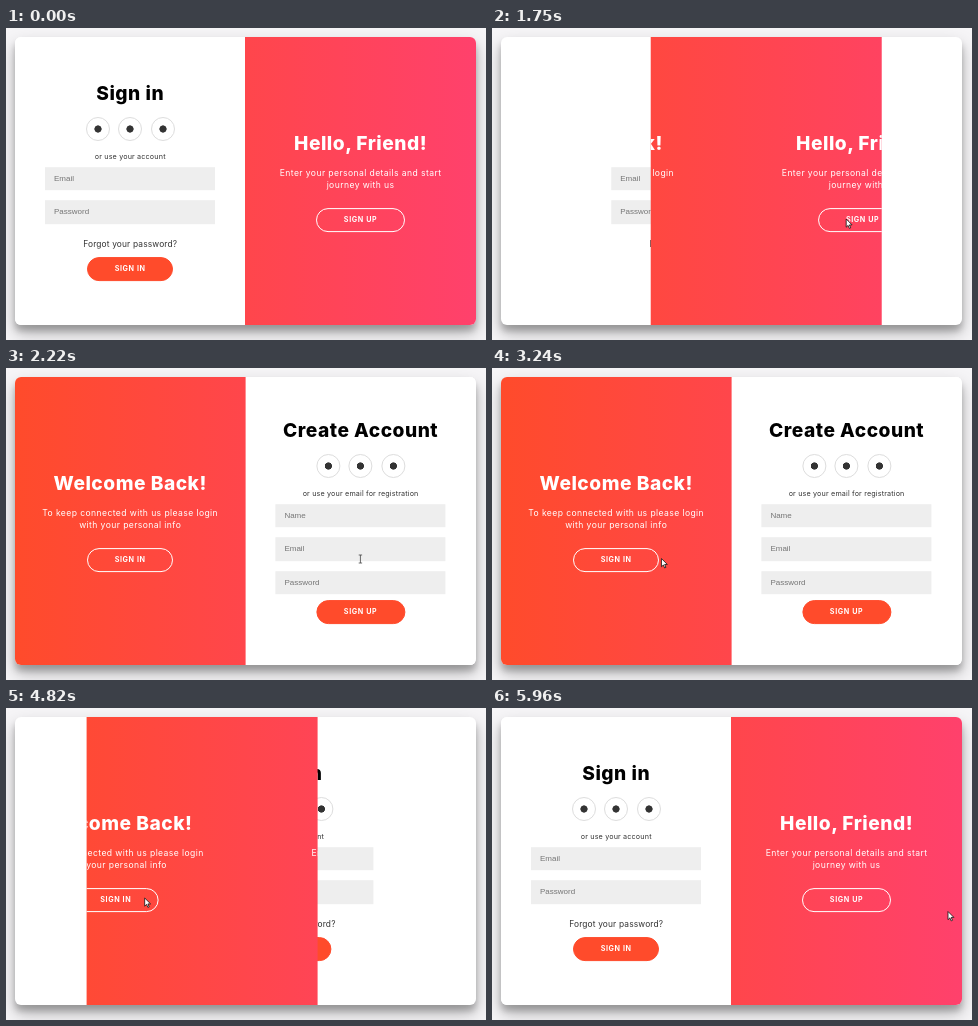
Recreate the animation shown at these times as an HTML page. Size 480x312 px, loop 6.03 s.

```html
<!DOCTYPE html>
<html lang="en">
<head>
<meta charset="utf-8">
<title>Sliding sign-in panel</title>
<style>
  html, body { margin: 0; width: 100%; height: 100%; overflow: hidden; background: #f6f5f7; }
  body { font: 8.6px/12px Inter, sans-serif; color: #333; }
  #stage { --p: 0; position: relative; width: 480px; height: 312px; overflow: hidden; }

  .card, .half, .slider, .overlay, .row, .ghost, #pointer { position: absolute; }
  .card {
    left: 9px; top: 9px; width: 460.8px; height: 288px; overflow: hidden;
    border-radius: 6px; background: #fff;
  }
  .shadow { box-shadow: 0 8.4px 16.8px rgba(0,0,0,.25), 0 6px 6px rgba(0,0,0,.22); }
  .half { top: 0; left: 0; width: 50%; height: 100%; }
  .form { background: #fff; transform: translateX(calc(var(--p) * 100%)); }

  .slider {
    top: 0; left: 50%; width: 50%; height: 100%; overflow: hidden;
    transform: translateX(calc(var(--p) * -100%));
  }
  .overlay {
    top: 0; left: -100%; width: 200%; height: 100%; color: #fff;
    background: linear-gradient(to right, #ff4b2b, #ff416c);
    transform: translateX(calc(var(--p) * 50%));
  }
  .back { transform: translateX(calc((var(--p) - 1) * 20%)); }
  .hello { left: 50%; transform: translateX(calc(var(--p) * 20%)); }

  /* every row is centred on --y */
  .row {
    left: 0; right: 0; top: calc(var(--y) * 1px); transform: translateY(-50%);
    text-align: center; white-space: nowrap;
  }
  h1.row { margin: 0; font-size: 19.2px; line-height: 24px; font-weight: 800; letter-spacing: .5px; }
  .form h1 { color: #000; }
  .text { letter-spacing: .4px; }
  .note { font-size: 7.2px; letter-spacing: .16px; }
  .link { font-size: 8.4px; letter-spacing: .15px; }
  .field {
    left: 30px; right: 30px; height: 23.6px; padding-left: 9px; background: #eee;
    font: 8px/23.6px "Liberation Sans", Arial, sans-serif; color: #757575; text-align: left;
  }
  .button {
    box-sizing: border-box; width: 86.4px; height: 23.8px; margin: 0 auto;
    border: .6px solid #ff4b2b; border-radius: 12px; background: #ff4b2b; color: #fff;
    font-size: 7.2px; line-height: 22.6px; font-weight: 700; letter-spacing: .6px;
  }
  .wide { width: 89px; }
  .clear { background: none; border: 1px solid #fff; line-height: 21.8px; }
  .icons { display: flex; justify-content: center; gap: 8.4px; }
  .icons i {
    box-sizing: border-box; width: 24px; height: 24px; border: .8px solid #ddd; border-radius: 50%;
    background: radial-gradient(circle, #333 3.3px, transparent 3.9px);
  }
  #pointer { left: 0; top: 0; overflow: visible; }
</style>
</head>
<body>
<div id="stage">
  <div class="card shadow">
    <div class="half form">
      <h1 class="row" style="--y:56">Sign in</h1>
      <div class="row icons" style="--y:91.7"><i></i><i></i><i></i></div>
      <div class="row note" style="--y:120.3">or use your account</div>
      <div class="row field" style="--y:141.8">Email</div>
      <div class="row field" style="--y:175.1">Password</div>
      <div class="row link" style="--y:206.5">Forgot your password?</div>
      <div class="row button" style="--y:232.3">SIGN IN</div>
    </div>
    <div class="half form" id="signup">
      <h1 class="row" style="--y:53">Create Account</h1>
      <div class="row icons" style="--y:88.7"><i></i><i></i><i></i></div>
      <div class="row note" style="--y:117.4">or use your email for registration</div>
      <div class="row field" style="--y:138.9">Name</div>
      <div class="row field" style="--y:172.3">Email</div>
      <div class="row field" style="--y:205.7">Password</div>
      <div class="row button wide" style="--y:235">SIGN UP</div>
    </div>
    <div class="slider">
      <div class="overlay">
        <div class="half back">
          <h1 class="row" style="--y:106">Welcome Back!</h1>
          <div class="row text" style="--y:141.5">To keep connected with us please login<br>with your personal info</div>
          <div class="row button clear" style="--y:183">SIGN IN</div>
        </div>
        <div class="half hello">
          <h1 class="row" style="--y:106">Hello, Friend!</h1>
          <div class="row text" style="--y:141.5">Enter your personal details and start<br>journey with us</div>
          <div class="row button clear wide" style="--y:183">SIGN UP</div>
        </div>
      </div>
    </div>
  </div>
  <svg id="pointer" width="1" height="1">
    <path id="arrow" d="M0 0V8.2L1.9 6.4 3.2 9.4 4.5 8.8 3.2 5.9H5.9Z" fill="#fff" stroke="#111" stroke-width=".8"/>
    <path id="beam" d="M-1.7-4H1.7M0-4V4M-1.7 4H1.7" fill="none" stroke="#444" stroke-width=".8"/>
    <circle id="click" r="8.2" fill="#ff8c1a" opacity=".85"/>
  </svg>
</div>
<script>
  const LOOP = 6030, HALF = 230.4, TICK = 77;
  const $ = id => document.getElementById(id);
  const show = (id, on) => { $(id).style.visibility = on ? 'visible' : 'hidden'; };

  // CSS ease-in-out, cubic-bezier(.42, 0, .58, 1)
  function ease(x) {
    if (x <= 0) return 0;
    if (x >= 1) return 1;
    let lo = 0, hi = 1, s;
    for (let i = 0; i < 24; i++) {
      s = (lo + hi) / 2;
      const bx = 3 * (1 - s) * s * ((1 - s) * .42 + s * .58) + s ** 3;
      if (bx < x) lo = s; else hi = s;
    }
    return s * s * (3 - 2 * s);
  }

  // A slide as a low-rate screen recording shows it: first seen at `from`, held for `step`
  function slide(t, from, step, start, length) {
    if (t < from) return 0;
    const held = from + Math.floor((t - from) / step) * step;
    const u = (held - start) / length;
    return u > .94 ? 1 : ease(u);
  }

  // time, x, y
  const path = [
    [580, 469, 202], [1040, 354, 191], [2692, 354.5, 191], [3320, 142, 190.5],
    [3470, 138.7, 190], [5504, 138.7, 190], [5960, 456, 203.5], [LOOP, 456, 203.5]
  ];

  function pointerAt(t) {
    const i = Math.max(1, path.findIndex(k => t < k[0]));
    const [a, x0, y0] = path[i - 1], [b, x1, y1] = path[i];
    const n = Math.max(1, Math.round((b - a) / TICK));
    const e = ease(Math.floor((t - a) / (b - a) * n) / n);
    return [x0 + (x1 - x0) * e, y0 + (y1 - y0) * e];
  }

  function draw(t) {
    const out = slide(t, 1672, 78, 1462, 702);
    const back = slide(t, 4400, 80, 4522, 717);
    const p = out - back;
    $('stage').style.setProperty('--p', p);
    show('signup', out >= .5 && back === 0);

    const [x, y] = pointerAt(t);
    const cover = x - (239.4 - HALF * p), field = x - (39 + HALF * p);
    const covered = cover > 0 && cover < HALF;
    const typing = !covered && field > 0 && field < 170.4 && y > 172 && y < 196;
    const seen = t >= 580;
    $('pointer').style.transform = `translate(${x}px, ${y}px)`;
    show('arrow', seen && !typing);
    show('beam', seen && typing);
    show('click', (t >= 1440 && t < 1510) || (t >= 4400 && t < 4490));
  }

  const began = performance.now();
  function run() {
    draw((performance.now() - began) % LOOP);
    requestAnimationFrame(run);
  }
  run();
</script>
</body>
</html>
```
